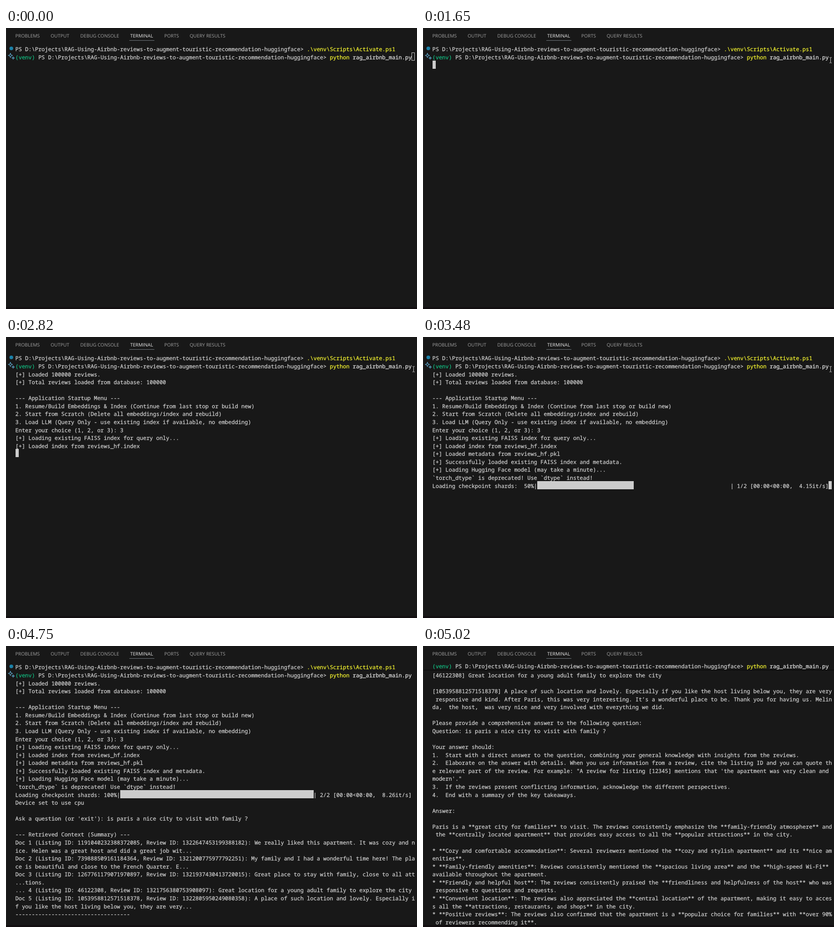
An HTML page for the animation above (8 s loop, 903 by 620 pixels).

```html
<!DOCTYPE html>
<html lang="en">
<head>
<meta charset="utf-8">
<title>Terminal session</title>
<style>
  html, body { margin: 0; width: 100%; height: 100%; overflow: hidden; background: #181818; }
  svg { display: block; }
  text { white-space: pre; text-rendering: geometricPrecision; }
  .term text { font: 12px "Noto Sans Mono", "DejaVu Sans Mono", monospace; letter-spacing: -.003px;
    font-variant-ligatures: none; fill: #d2d2d2; stroke: #d2d2d2; stroke-width: .25px; }
  .tabs text { font: 10.4px "Open Sans", "Noto Sans", sans-serif; fill: #a2a2a2; }
  .tabs .active { fill: #ececec; }
  .term .green { fill: #12bd80; stroke: #12bd80; }
  .term .yellow { fill: #f8f830; stroke: #f8f830; }
  .term .white { fill: #e8e8e8; stroke: #e8e8e8; }
</style>
</head>
<body>
<svg width="903" height="620" viewBox="0 0 903 620">
  <rect width="903" height="620" fill="#181818"/>
  <rect width="1" height="620" fill="#252525"/>
  <rect y="616" width="903" height="4" fill="#120e10"/>
  <g class="tabs" id="tabs"></g>
  <rect x="271" y="27" width="55" height="1" fill="#737a80"/>
  <g id="marks">
    <circle cx="11.7" cy="45" r="4.1" fill="#1b81a8"/>
    <g fill="none" stroke="#62acd2" stroke-width="1.1" stroke-linejoin="round">
      <path d="M9.7 55.6 11 59.2 14.4 60.6 11 62 9.7 65.4 8.4 62 5 60.6 8.4 59.2Z"/>
      <path d="M15.7 63.4 16.5 65.4 18.6 66.2 16.5 67 15.7 69 14.9 67 12.8 66.2 14.9 65.4Z"/>
    </g>
  </g>
  <g class="term" id="term"></g>
  <rect id="bar" x="251" y="318" height="18" fill="#ccc"/>
  <g id="sticky">
    <rect x="1" y="35" width="902" height="18" fill="#181818"/>
    <rect x="1" y="52.5" width="902" height="1.5" fill="#0b0b0b"/>
    <g class="term" id="stickyText"></g>
  </g>
  <rect id="cursor"/>
  <path id="mouse" d="M-2.5 -6H-.8L0 -5.4.8 -6H2.5M0 -5.4V5.4M-2.5 6H-.8L0 5.4.8 6H2.5" fill="none" stroke="#d8d8d8"/>
</svg>
<script>
const LOOP = 8000, X0 = 20.5, Y0 = 36.9, CELL = 7.197, ROW = 17.57, ROW_BOX = 18, BASELINE = 15;
const $ = id => document.getElementById(id);

const path = "PS D:\\Projects\\RAG-Using-Airbnb-reviews-to-augment-touristic-recommendation-huggingface> ";
const activate = [["", path], ["yellow", ".\\venv\\Scripts\\Activate.ps1"]];
const run = [["green", "(venv) "], ["", path], ["yellow", "python "], ["white", "rag_airbnb_main.py"]];

const choice = "Enter your choice (1, 2, or 3): ";
const ask = "Ask a question (or 'exit'): ";
const question = "is paris a nice city to visit with family ?";

const log = [activate, run,
  "[+] Loaded 100000 reviews.",
  "[+] Total reviews loaded from database: 100000",
  "",
  "--- Application Startup Menu ---",
  "1. Resume/Build Embeddings & Index (Continue from last stop or build new)",
  "2. Start from Scratch (Delete all embeddings/index and rebuild)",
  "3. Load LLM (Query Only - use existing index if available, no embedding)",
  choice + "3",
  "[+] Loading existing FAISS index for query only...",
  "[+] Loaded index from reviews_hf.index",
  "[+] Loaded metadata from reviews_hf.pkl",
  "[+] Successfully loaded existing FAISS index and metadata.",
  "[+] Loading Hugging Face model (may take a minute)...",
  "`torch_dtype` is deprecated! Use `dtype` instead!",
  shards(100, "| 2/2 [00:00<00:00,  8.26it/s]"),
  "Device set to use cpu",
  "",
  ask + question,
  "",
  "--- Retrieved Context (Summary) ---",
  "Doc 1 (Listing ID: 1191040232388372085, Review ID: 1322647453199388182): We really liked this apartment. It was cozy and n",
  "ice. Helen was a great host and did a great job wit...",
  "Doc 2 (Listing ID: 739888509161184364, Review ID: 1321200775977792251): My family and I had a wonderful time here! The pla",
  "ce is beautiful and close to the French Quarter. E...",
  "Doc 3 (Listing ID: 1267761179071970897, Review ID: 1321937430413720015): Great place to stay with family, close to all att",
  "...tions.",
  "... 4 (Listing ID: 46122308, Review ID: 1321756380753908097): Great location for a young adult family to explore the city",
  "Doc 5 (Listing ID: 1053958812571518378, Review ID: 1322805950249080358): A place of such location and lovely. Especially i",
  "f you like the host living below you, they are very...",
  "-----------------------------------"
];

const answer = ["",
  "[46122308] Great location for a young adult family to explore the city",
  "",
  "[1053958812571518378] A place of such location and lovely. Especially if you like the host living below you, they are very",
  " responsive and kind. After Paris, this was very interesting. It’s a wonderful place to be. Thank you for having us. Melin",
  "da,  the host,  was very nice and very involved with everything we did.",
  "",
  "Please provide a comprehensive answer to the following question:",
  "Question: " + question,
  "",
  "Your answer should:",
  "1.  Start with a direct answer to the question, combining your general knowledge with insights from the reviews.",
  "2.  Elaborate on the answer with details. When you use information from a review, cite the listing ID and you can quote th",
  "e relevant part of the review. For example: \"A review for listing [12345] mentions that 'the apartment was very clean and",
  "modern'.\"",
  "3.  If the reviews present conflicting information, acknowledge the different perspectives.",
  "4.  End with a summary of the key takeaways.",
  "",
  "Answer:",
  "",
  "Paris is a **great city for families** to visit. The reviews consistently emphasize the **family-friendly atmosphere** and",
  " the **centrally located apartment** that provides easy access to all the **popular attractions** in the city.",
  "",
  "* **Cozy and comfortable accommodation**: Several reviewers mentioned the **cozy and stylish apartment** and its **nice am",
  "enities**.",
  "* **Family-friendly amenities**: Reviews consistently mentioned the **spacious living area** and the **high-speed Wi-Fi**",
  "available throughout the apartment.",
  "* **Friendly and helpful host**: The reviews consistently praised the **friendliness and helpfulness of the host** who was",
  " responsive to questions and requests.",
  "* **Convenient location**: The reviews also appreciated the **central location** of the apartment, making it easy to acces",
  "s all the **attractions, restaurants, and shops** in the city.",
  "* **Positive reviews**: The reviews also confirmed that the apartment is a **popular choice for families** with **over 90%",
  " of reviewers recommending it**."
];

// Progress line padded to 121 columns; the filled part is a rect
function shards(percent, tail) {
  const head = "Loading checkpoint shards: " + String(percent).padStart(3) + "%|";
  return head + tail.padStart(121 - head.length);
}

const far = [895.5, 71], near = [578, 315];

// at: start time, rows: full log lines, last: partial line, cur: cursor [row, col]
const phases = [
  { at: 0, rows: 2, cur: [1, 121], hollow: true },
  { at: 70, rows: 2, cur: [1, 121], hollow: true, mouse: far },
  { at: 160, rows: 2, cur: [1, 121], mouse: far },
  { at: 1650, rows: 2, cur: [2, 0], mouse: far },
  { at: 2400, rows: 4, cur: [4, 0], mouse: far },
  { at: 2470, rows: 9, last: choice, cur: [9, 32], mouse: far },
  { at: 2690, rows: 10, cur: [9, 33], mouse: far },
  { at: 2750, rows: 11, cur: [11, 0], mouse: far },
  { at: 2820, rows: 12, cur: [12, 0], mouse: far },
  { at: 2890, rows: 15, cur: [15, 0], mouse: far },
  { at: 3220, rows: 16, cur: [16, 0], mouse: far },
  { at: 3280, rows: 16, last: shards(0, "| 0/2 [00:00<?, ?it/s]"), cur: [16, 121], mouse: far },
  { at: 3480, rows: 16, last: shards(50, "| 1/2 [00:00<00:00,  4.15it/s]"), bar: 29.5, cur: [16, 121], mouse: far },
  { at: 3550, rows: 17, bar: 59, cur: [17, 0], mouse: far },
  { at: 3820, rows: 18, bar: 59, cur: [18, 0], mouse: far },
  { at: 3890, rows: 19, last: ask, bar: 59, cur: [19, 28], mouse: far },
  { at: 4490, rows: 20, bar: 59, cur: [19, 71], mouse: near },
  { at: 4620, rows: 20, bar: 59, cur: [20, 0] },
  { at: 4750, rows: 32, bar: 59 },
  { at: 4880, final: true },
  { at: 5020, final: true, sticky: true }
];

const esc = s => s.replace(/&/g, "&amp;").replace(/</g, "&lt;");
const rowTop = row => Math.floor(Y0 + row * ROW);

function lineSvg(line, row, dy = 0) {
  const parts = typeof line === "string" ? [["", line]] : line;
  const spans = parts.map(([cls, s]) => `<tspan class="${cls}">${esc(s)}</tspan>`).join("");
  return `<text x="${X0}" y="${rowTop(row) + BASELINE + dy}">${spans}</text>`;
}

function set(el, attrs) {
  for (const k in attrs) el.setAttribute(k, attrs[k]);
}

const show = (id, on) => set($(id), { visibility: on ? "visible" : "hidden" });

function drawCursor([row, col], hollow) {
  const inset = hollow ? .5 : 0;
  set($("cursor"), {
    x: Math.round(X0 + col * CELL) + inset, y: rowTop(row) + inset,
    width: 7 - 2 * inset, height: ROW_BOX - 2 * inset,
    fill: hollow ? "none" : "#ccc", stroke: hollow ? "#ccc" : "none"
  });
}

function draw(p) {
  const lines = p.final ? answer : log.slice(0, p.rows).concat(p.last || []);
  $("term").innerHTML = lines.map((s, i) => s ? lineSvg(s, i) : "").join("");
  $("stickyText").innerHTML = p.sticky ? lineSvg(run, 0, -2) : "";
  show("sticky", p.final);
  show("marks", !p.final);
  show("bar", p.bar);
  set($("bar"), { width: Math.round((p.bar || 0) * CELL) });
  show("cursor", p.cur);
  if (p.cur) drawCursor(p.cur, p.hollow);
  show("mouse", p.mouse);
  if (p.mouse) set($("mouse"), { transform: `translate(${p.mouse})` });
}

$("tabs").innerHTML = [["PROBLEMS", 20.5], ["OUTPUT", 98], ["DEBUG CONSOLE", 163.3], ["TERMINAL", 273],
  ["PORTS", 347.7], ["QUERY RESULTS", 403.5]].map(([s, x]) =>
  `<text x="${x}" y="21" class="${s === "TERMINAL" ? "active" : ""}">${s}</text>`).join("");

let shown;
const start = performance.now();
function tick() {
  const t = (performance.now() - start) % LOOP;
  const p = phases.findLast(q => q.at <= t) || phases[0];
  if (p !== shown) draw(shown = p);
  requestAnimationFrame(tick);
}
tick();
</script>
</body>
</html>
```
